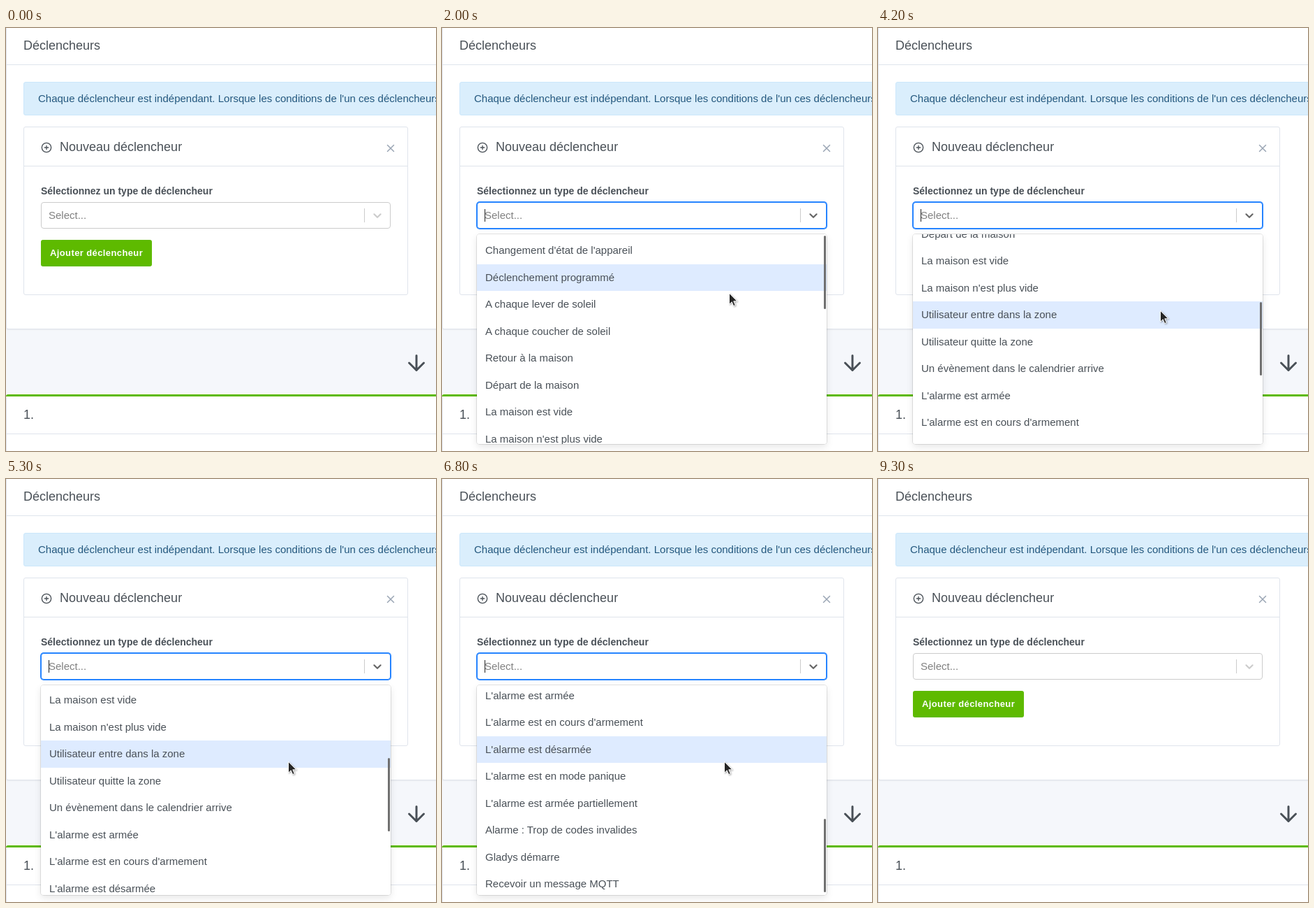
An HTML page that plays this animation: 616x605 px, repeating every 9400 ms.

```html
<!DOCTYPE html>
<html lang="fr">
<head>
<meta charset="utf-8">
<title>Déclencheurs</title>
<style>
* { box-sizing: border-box; }
html, body { margin: 0; width: 100%; height: 100%; overflow: hidden; }
body { position: relative; background: #f5f7fb; color: #495057; font: 15px/22.5px "Liberation Sans", Arial, sans-serif; }
div, svg { position: absolute; white-space: nowrap; }
svg { overflow: visible; fill: none; stroke: #495057; stroke-width: 2; stroke-linecap: round; stroke-linejoin: round; }
.card { background: #fff; border: 1px solid #dfe4ec; border-radius: 3px; }
.shadow { box-shadow: 0 1px 2px rgba(0, 0, 0, .05); }
.rule { height: 1px; background: #dfe4ec; }
.title { font-size: 18px; line-height: 28px; }
.alert { left: 25px; top: 77px; width: 640px; height: 48px; padding: 12px 20px; color: #24587e; background: #daeefc; border: 1px solid #cbe7fb; border-radius: 3px; }
.label { left: 50px; top: 223px; font-size: 14px; line-height: 20px; font-weight: 700; }
.button { left: 50px; top: 303px; width: 159px; height: 38px; padding: 7px 13px; border-radius: 3px; background: #5eba00; color: #fff; font-size: 13px; line-height: 24px; font-weight: 700; letter-spacing: .03em; }
.select { left: 50px; top: 249px; width: 501px; height: 38px; background: #fff; border: 1px solid #ccc; border-radius: 4px; }
.select.focus { border-color: #2684ff !important; box-shadow: 0 0 0 1px #2684ff; }
.hint { left: 10px; top: 8px; line-height: 20px; color: #808080; }
.caret { left: 10px; top: 9px; width: 1px; height: 18px; background: #222; }
.bar { left: 462px; top: 8px; width: 1px; height: 20px; background: #ccc; }
.chevron { left: 471px; top: 8px; stroke: #ccc; stroke-width: 2.2; }
.focus .chevron { stroke: #666; }
.menu { left: 50px; top: 295px; width: 501px; height: 300px; overflow: hidden; background: #fff; border-radius: 4px; }
.frame { left: 50px; top: 295px; width: 501px; height: 300px; border-radius: 4px; box-shadow: 0 0 0 1px rgba(0, 0, 0, .1), 0 4px 11px rgba(0, 0, 0, .1); }
.list { left: 0; width: 501px; }
.list div { left: 0; width: 501px; height: 38.5px; padding: 8px 12px; }
.list .on { background: #deebff; }
.thumb { left: 497px; width: 3px; height: 105px; border-radius: 1.5px; background: #6f6f6f; }
.cursor { left: 0; top: 0; filter: drop-shadow(1px 1px 1px rgba(0, 0, 0, .35)); }
</style>
</head>
<body>
<div class="card shadow" style="left:0;top:-10px;width:900px;height:441px"></div>
<div class="title" style="left:25px;top:11px">Déclencheurs</div>
<div class="rule" style="left:1px;top:52px;width:700px"></div>
<div class="alert">Chaque déclencheur est indépendant. Lorsque les conditions de l'un ces déclencheurs</div>

<div class="card" style="left:25px;top:141px;width:551px;height:241px"></div>
<svg style="left:49.5px;top:163px" width="16" height="16" viewBox="0 0 24 24"><circle cx="12" cy="12" r="10"/><path d="M12 8v8M8 12h8"/></svg>
<div class="title" style="left:77px;top:156px">Nouveau déclencheur</div>
<svg style="left:542px;top:162.5px;stroke:#9aa5b4" width="18" height="18" viewBox="0 0 24 24"><path d="M6 6l12 12M18 6L6 18"/></svg>
<div class="rule" style="left:26px;top:197px;width:549px"></div>
<div class="label">Sélectionnez un type de déclencheur</div>
<div class="button">Ajouter déclencheur</div>

<svg style="left:570px;top:460.5px" width="36" height="36" viewBox="0 0 24 24"><path d="M12 5v14M19 12l-7 7-7-7"/></svg>
<div class="card" style="left:0;top:524px;width:900px;height:200px"></div>
<div style="left:0;top:524px;width:900px;height:3px;border-radius:3px 3px 0 0;background:#5eba00"></div>
<div class="title" style="left:25px;top:539px">1.</div>
<div class="rule" style="left:1px;top:580px;width:700px"></div>

<div class="select" id="select">
  <div class="hint">Select...</div>
  <div class="caret" id="caret"></div>
  <div class="bar"></div>
  <svg class="chevron" width="20" height="20" viewBox="0 0 20 20"><path d="M5.4 8.3L10 12.8l4.6-4.5"/></svg>
</div>
<div id="drop">
  <div class="frame"></div>
  <div class="menu">
    <div class="list" id="list"></div>
    <div class="thumb" id="thumb"></div>
  </div>
</div>
<svg class="cursor" id="cursor" width="16" height="22"><path d="M.5 .5V16.2L4.2 12.8L6.7 18.6L9.3 17.5L6.8 11.8H11.6Z" fill="#262626" stroke="#fff" stroke-width="1"/></svg>

<script>
const LOOP = 9400, STEP = 100, ROW = 38.5, LIST_TOP = 299;
const OPEN = 1500, CLOSE = 8700;
const options = [
  "Changement d'état de l'appareil", "Déclenchement programmé",
  "A chaque lever de soleil", "A chaque coucher de soleil",
  "Retour à la maison", "Départ de la maison",
  "La maison est vide", "La maison n'est plus vide",
  "Utilisateur entre dans la zone", "Utilisateur quitte la zone",
  "Un évènement dans le calendrier arrive",
  "L'alarme est armée", "L'alarme est en cours d'armement",
  "L'alarme est désarmée", "L'alarme est en mode panique",
  "L'alarme est armée partiellement", "Alarme : Trop de codes invalides",
  "Gladys démarre", "Recevoir un message MQTT"
];
// Each key: time, then values
const path = [
  [300, 562, 88], [600, 530, 130], [1000, 455, 245], [1200, 440, 267],
  [1500, 440, 267], [1600, 437, 278], [2000, 411, 379], [2300, 404, 404],
  [7800, 404, 404], [8400, 410, 302], [8500, 410, 302], [9200, 430, 1]
];
const scrolls = [
  [2700, 0], [3000, 108], [3900, 108], [4200, 216], [5200, 216],
  [5600, 324], [6400, 324], [6800, 432], [7600, 432], [7800, 439.5]
];
const carets = [[1500, 2900], [4100, 5400], [6600, 7800], [8300, 8700]];

const $ = id => document.getElementById(id);
const [select, caret, drop, list, thumb, cursor] =
  ["select", "caret", "drop", "list", "thumb", "cursor"].map($);
const linear = p => p;
const smooth = p => p * p * (3 - 2 * p);

const rows = options.map((text, i) => {
  const row = document.createElement("div");
  row.textContent = text;
  row.style.top = i * ROW + "px";
  list.append(row);
  return row;
});

function sample(keys, t, ease) {
  const i = keys.findIndex(k => k[0] > t);
  if (i === 0) return keys[0].slice(1);
  if (i < 0) return keys[keys.length - 1].slice(1);
  const a = keys[i - 1], b = keys[i];
  const p = ease((t - a[0]) / (b[0] - a[0]));
  return a.slice(1).map((v, j) => v + (b[j + 1] - v) * p);
}

const show = (el, on) => { el.style.visibility = on ? "visible" : "hidden"; };

function draw(t) {
  const [x, y] = sample(path, t, linear);
  const [scroll] = sample(scrolls, t, smooth);
  const open = t >= OPEN && t < CLOSE;

  show(cursor, t >= 300 && t < 9300);
  cursor.style.transform = `translate(${Math.round(x)}px, ${Math.round(y)}px)`;

  select.classList.toggle("focus", open);
  select.style.borderColor = t < 1200 || t >= CLOSE ? "#ccc" : t < 1300 ? "#c0c0c0" : "#b3b3b3";
  show(caret, carets.some(([a, b]) => t >= a && t < b));

  show(drop, open);
  const top = scroll % 1 === 0.5 ? scroll : Math.round(scroll);
  list.style.top = 4 - top + "px";
  thumb.style.top = Math.round(2 + scroll * 0.4375) + "px";

  // The highlight trails the pointer by one step
  const [, hoverY] = sample(path, t - STEP, linear);
  const active = Math.floor((Math.max(hoverY, LIST_TOP) - LIST_TOP + scroll) / ROW);
  rows.forEach((row, i) => row.classList.toggle("on", i === active));
}

const start = performance.now();
function tick() {
  const t = (performance.now() - start) % LOOP;
  draw(Math.floor(t / STEP) * STEP);
  requestAnimationFrame(tick);
}
tick();
</script>
</body>
</html>
```
